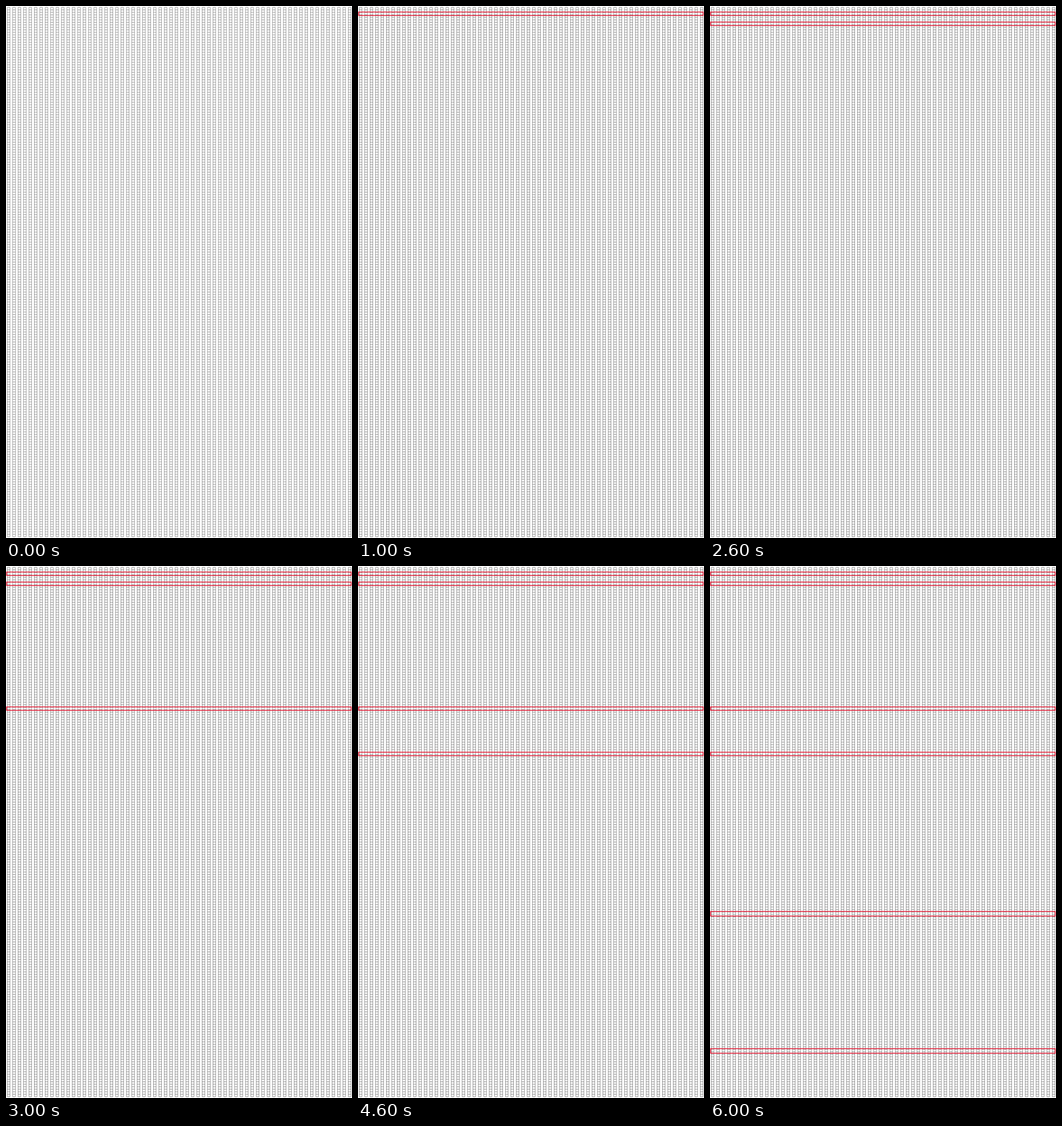
Recreate the animation shown at these times as an HTML page with a canvas. Size 604 px wide and 927 px high, loop 7 s.

```html
<!DOCTYPE html>
<html>
<head>
<meta charset="utf-8">
<style>
html, body { margin: 0; height: 100%; overflow: hidden; background: #fff; }
canvas { display: block; }
</style>
</head>
<body>
<canvas id="stage" width="604" height="927"></canvas>
<script>
const ctx = document.getElementById("stage").getContext("2d");
const COLUMNS = 64, ROWS = 212, CELL_WIDTH = 4.6;
const LEFT = 2.3, RIGHT = 602.2, TOP = 2.4, BOTTOM = 924.8;
const columnStep = (RIGHT - LEFT - CELL_WIDTH) / (COLUMNS - 1);
const rowStep = (BOTTOM - TOP) / ROWS;
const highlightCenters = [13.5, 31, 248.5, 327.5, 606, 845];

// Every column is a ladder of small cells
const ladders = new Path2D();
for (let c = 0; c < COLUMNS; c++) {
  const x = LEFT + c * columnStep;
  ladders.rect(x, TOP, CELL_WIDTH, BOTTOM - TOP);
  for (let r = 1; r < ROWS; r++) {
    const y = TOP + r * rowStep;
    ladders.moveTo(x, y);
    ladders.lineTo(x + CELL_WIDTH, y);
  }
}

function drawHighlight(center, index) {
  const half = Math.floor(3 + index / 4);
  ctx.strokeRect(1.2, center - half, 601.3, 2 * half);
}

function draw() {
  const shown = Math.floor(performance.now() % 7000 / 1000);
  ctx.fillStyle = "#fff";
  ctx.fillRect(0, 0, 604, 927);
  ctx.lineWidth = 0.5;
  ctx.strokeStyle = shown ? "#333" : "#444";
  ctx.stroke(ladders);
  ctx.lineWidth = 1.4;
  ctx.strokeStyle = "#e5152f";
  highlightCenters.slice(0, shown).forEach(drawHighlight);
  requestAnimationFrame(draw);
}
draw();
</script>
</body>
</html>
```
